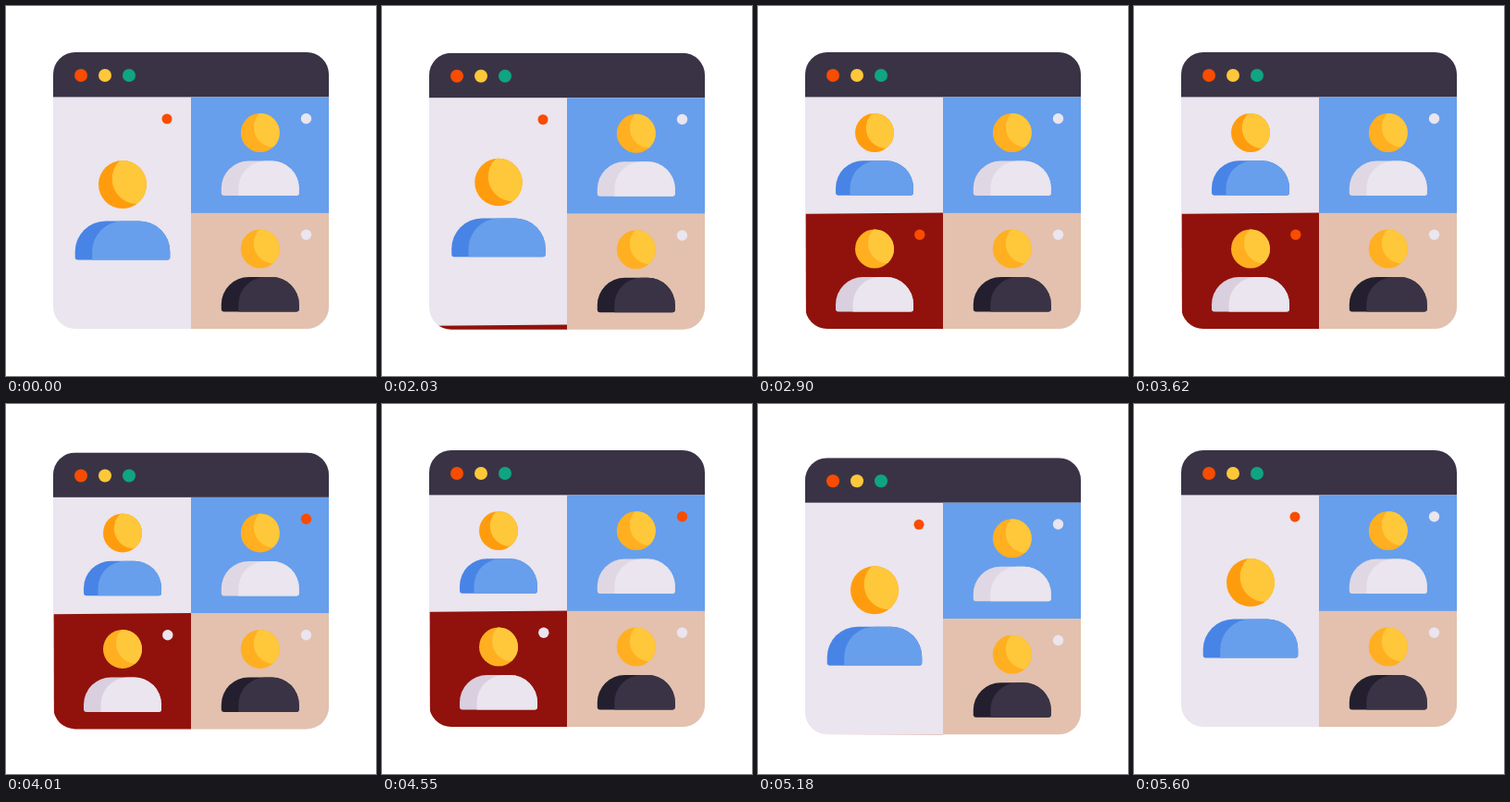
Animation of 400x400 px, one loop 5630 ms. Source, as an HTML page with a canvas:

```html
<!DOCTYPE html>
<html lang="en">
<head>
<meta charset="utf-8">
<title>Video call window</title>
<style>
  html, body { margin: 0; width: 100%; height: 100%; overflow: hidden; background: #fff; }
  canvas { display: block; }
</style>
</head>
<body>
<canvas width="400" height="400"></canvas>
<script>
const ctx = document.querySelector('canvas').getContext('2d');
const LOOP = 5630;
const DARK = '#3a3346', PALE = '#eae5ee', BLUE = '#679fec', TAN = '#e3c1ae',
      RED = '#91120c', ORANGE = '#f84c00', YELLOW = '#ffc73a', GREEN = '#0fa581';

const clamp = x => Math.min(1, Math.max(0, x));
const mix = (a, b, k) => a + (b - a) * k;
const ramp = (t, start, length) => clamp((t - start) / length);
const smooth = x => (1 - Math.cos(Math.PI * x)) / 2;

// cubic-bezier(.25, .1, .25, 1)
function ease(x) {
  let lo = 0, hi = 1;
  for (let i = 0; i < 20; i++) {
    const s = (lo + hi) / 2;
    if (0.75 * s * (1 - s) + s ** 3 < x) lo = s; else hi = s;
  }
  return 0.3 * lo * (1 - lo) ** 2 + 3 * lo * lo * (1 - lo) + lo ** 3;
}

const bump = (t, start, rise, fall, height) =>
  height * (smooth(ramp(t, start, rise)) - smooth(ramp(t, start + rise, fall)));

function rect(x, y, w, h, color) {
  ctx.fillStyle = color;
  ctx.fillRect(x, y, w, h);
}

function disc(x, y, r, color) {
  ctx.fillStyle = color;
  ctx.beginPath();
  ctx.arc(x, y, r, 0, 2 * Math.PI);
  ctx.fill();
}

function rounded(x, y, w, h, radii, color) {
  ctx.fillStyle = color;
  ctx.beginPath();
  ctx.roundRect(x, y, w, h, radii);
  ctx.fill();
}

function head(x, y, r, shade, dx, dy) {
  const k = r / 21;
  disc(x, y, r, shade);
  ctx.save();
  ctx.clip();
  disc(x + dx * k, y + dy * k, 22 * k, YELLOW);
  ctx.restore();
}

function torso(x, top, halfWidth, height, radius, inset, shade, color) {
  const left = x - halfWidth, width = 2 * halfWidth;
  rounded(left, top, width, height, [radius, radius, 3, 3], shade);
  rounded(left + inset, top, width - inset, height, [radius, radius, 3, 0], color);
}

function guest(x, y, shade, color) {
  head(x, y, 21, '#ffaf20', 15, -6);
  torso(x, y + 30.5, 42, 37.5, 29.5, 18.5, shade, color);
}

function host(k) {
  head(126, mix(193, 137, k), mix(26, 21, k), '#ff9c0e', 12.8, -5);
  torso(126, mix(232.5, 167.2, k), mix(51.3, 42, k), mix(42, 37.5, k),
        mix(33, 29.5, k), mix(18.5, 15.5, k), '#4884e6', BLUE);
}

function draw(t) {
  const hostShrink = ease(ramp(t, 1992, 540)) - ease(ramp(t, 4672, 540));
  const panelUp = ease(ramp(t, 1996, 540)) - ease(ramp(t, 4712, 540));
  const sink = bump(t, 1985, 290, 500, 12.5) + bump(t, 3620, 230, 450, 3.4) +
               bump(t, 4670, 290, 500, 14);
  const hostDot = 1 - ramp(t, 2040, 150) + ramp(t, 4960, 150);

  rect(0, 0, 400, 400, '#fff');
  ctx.save();
  ctx.translate(0, sink);
  ctx.beginPath();
  ctx.roundRect(51, 50, 298, 299, 24);
  ctx.clip();

  rect(51, 50, 298, 299, PALE);
  rect(51, 50, 298, 48.4, DARK);
  [ORANGE, YELLOW, GREEN].forEach((color, i) => disc(81 + 26 * i, 75, 7, color));

  host(hostShrink);
  if (hostDot > 0) disc(174, 122, 5.5 * hostDot, ORANGE);

  if (panelUp > 0) {
    ctx.save();
    ctx.translate(0, 126.3 * (1 - panelUp));
    ctx.fillStyle = RED;
    ctx.beginPath();
    ctx.moveTo(51.7, 224.8);
    ctx.lineTo(200, 223.6);
    ctx.lineTo(200, 352);
    ctx.lineTo(52, 352);
    ctx.fill();
    guest(126, 262.5, '#d9cfde', PALE);
    disc(174.8, 247.3, 5.7, t < 3650 ? ORANGE : PALE);
    ctx.restore();
  }

  rect(200, 98.5, 149, 125.5, BLUE);
  guest(274.8, 137, '#dfd8e4', PALE);
  disc(324.5, 121.8, 5.7, t >= 3650 && t < 4670 ? ORANGE : PALE);

  rect(200, 223.8, 149, 126, TAN);
  guest(274.8, 262.5, '#231f2e', DARK);
  disc(324.5, 247.3, 5.7, PALE);
  ctx.restore();
}

function frame(now) {
  draw(now % LOOP);
  requestAnimationFrame(frame);
}
requestAnimationFrame(frame);
</script>
</body>
</html>
```
